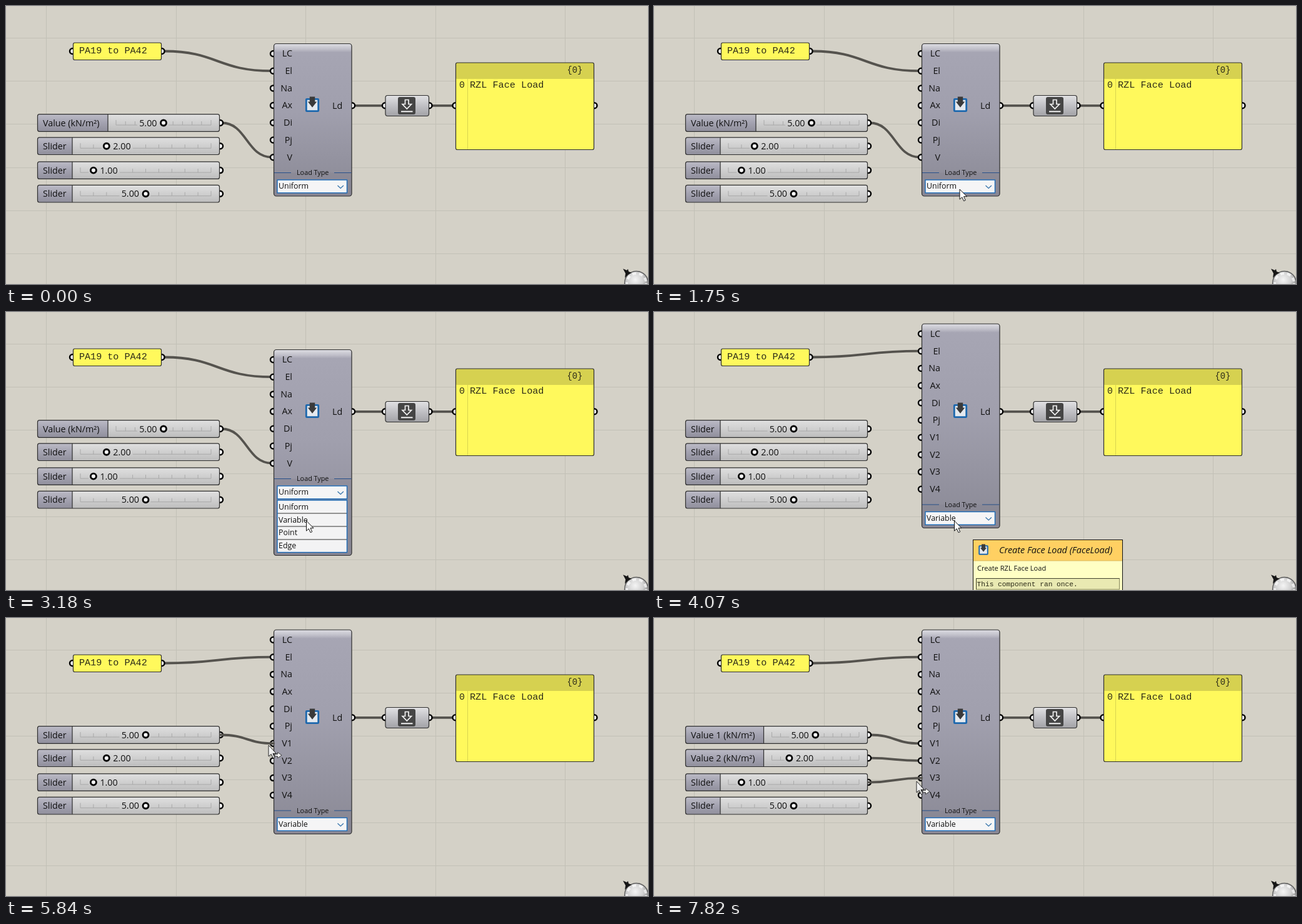
These frames come from a looping animation (1027 px wide and 446 px high, 8 s). An HTML page:

```html
<!DOCTYPE html>
<html lang="en">
<head>
<meta charset="utf-8">
<title>Face load</title>
<style>
html, body { margin: 0; width: 100%; height: 100%; overflow: hidden; background: #d4d1c7; }
svg { display: block; width: 100%; height: 100%; }
text { font-family: "Open Sans", "Noto Sans", sans-serif; font-size: 14.3px; fill: #111; white-space: pre; }
.mono { font-family: "Liberation Mono", monospace; fill: #2c2b18; }
.edge { stroke: #2e2e2e; stroke-width: 1.2; }
.wire { fill: none; stroke: #55534e; stroke-width: 3.8; stroke-linecap: round; }
.grip { fill: #fff; stroke: #000; stroke-width: 2.5; }
</style>
</head>
<body>
<svg viewBox="0 0 1027 446" preserveAspectRatio="none">
  <defs>
    <linearGradient id="body" x2="0" y2="1"><stop stop-color="#a7a6b4"/><stop offset=".45" stop-color="#a09fad"/><stop offset="1" stop-color="#8a8995"/></linearGradient>
    <linearGradient id="gloss" x2="0" y2="1"><stop stop-color="#fff" stop-opacity=".62"/><stop offset=".6" stop-color="#fff" stop-opacity=".3"/><stop offset="1" stop-color="#fff" stop-opacity="0"/></linearGradient>
    <linearGradient id="light" x2="0" y2="1"><stop stop-color="#e0e0e0"/><stop offset=".5" stop-color="#cfcfcf"/><stop offset="1" stop-color="#bdbdbd"/></linearGradient>
    <linearGradient id="tag" x2="0" y2="1"><stop stop-color="#bcbbc6"/><stop offset=".5" stop-color="#a3a2b0"/><stop offset="1" stop-color="#908f9c"/></linearGradient>
    <linearGradient id="node" x2="0" y2="1"><stop stop-color="#e2e2e4"/><stop offset=".5" stop-color="#c0c0c4"/><stop offset="1" stop-color="#a2a2a6"/></linearGradient>
    <linearGradient id="arrow" x2="1" y2="1"><stop stop-color="#fff"/><stop offset="1" stop-color="#d8d8d8"/></linearGradient>
    <radialGradient id="ball" cx=".45" cy=".35"><stop stop-color="#f4f4f4"/><stop offset=".7" stop-color="#cfcfcf"/><stop offset="1" stop-color="#9c9c9c"/></radialGradient>
  </defs>
  <g id="scene"></g>
</svg>
<script>
const LOOP = 8000;
const scene = document.getElementById('scene');
const UNIT = ' (kN/m²)';
const SLIDER_Y = [187.5, 224.7, 263.6, 301.2];
const VALUES = [5, 2, 1, 5];
const PITCH = 27.7;

// Cursor moves: start, end, steps, target x, target y
const MOVES = [
  [100, 860, 8, 345, 201], [980, 980, 1, 344, 191],
  [1310, 1640, 4, 445, 248], [1750, 1750, 1, 489, 294], [1860, 2090, 3, 494, 292],
  [2740, 3180, 5, 480.5, 335],
  [4400, 4940, 6, 343, 218], [5050, 5160, 2, 342, 191],
  [5280, 5840, 6, 420, 204], [5980, 6160, 3, 343, 221],
  [6490, 6710, 3, 431, 227.5], [6820, 7260, 5, 343, 261],
  [7360, 7820, 5, 420, 262]
];
const DRAGS = [[5280, 5980], [6490, 6820], [7360, LOOP]];
const GRIP_CURSOR = [[980, 1310], [4940, 5980], [6160, 6820], [7260, LOOP]];

const within = (t, [a, b]) => t >= a && t < b;
const rect = (x, y, w, h, attrs) => `<rect x="${x}" y="${y}" width="${w}" height="${h}" ${attrs}/>`;
const text = (x, y, s, attrs = '') => `<text x="${x}" y="${y}" ${attrs}>${s}</text>`;
const path = (d, attrs) => `<path d="${d}" ${attrs}/>`;
const grip = (x, y) => `<circle class="grip" cx="${x}" cy="${y}" r="4.5"/>`;
const mono = (x, y, s, size) => text(x, y, s, `class="mono" style="font-size:${size}px"`);
const small = (x, y, s, size) => text(x, y, s, `style="font-size:${size}px"`);

function wire(x1, y1, x2, y2) {
  const m = (x1 + x2) / 2;
  return path(`M${x1} ${y1}C${m} ${y1} ${m} ${y2} ${x2} ${y2}`, 'class="wire"');
}

function grid() {
  let d = '';
  for (let x = 64.5; x < 1027; x += 207.5) d += `M${Math.floor(x) + .5} 0V446`;
  for (let y = 51.5; y < 446; y += 69.2) d += `M0 ${Math.floor(y) + .5}H1027`;
  return path(d, 'stroke="#c2c0b6" fill="none"');
}

function slider(cy, value, name) {
  const split = name === 'Slider' ? 106 : name.startsWith('Value ' + '(') ? 163 : 175.5;
  const start = split + 13, gap = (328 - start) / 10;
  const knob = start + value * gap, left = value >= 5;
  const hideA = knob - (left ? 42 : 8), hideB = knob + (left ? 8 : 42);
  const top = cy - 13.8;
  let ticks = `M${start} ${cy + 3.5}H${Math.max(start, hideA)}M${hideB} ${cy + 3.5}H328`;
  for (let i = 0; i <= 10; i++) {
    const x = start + i * gap;
    if (x < hideA || x > hideB) ticks += `M${x} ${cy + 3.5}v${i % 10 ? -6 : -8}`;
  }
  return grip(342.5, cy) +
    rect(50.5, top, 291, 27.6, 'rx="3" fill="url(#light)"') +
    rect(50.5, top, split - 50.5, 27.6, 'rx="3" fill="url(#tag)"') +
    path(`M${split} ${top}v27.6`, 'class="edge"') +
    rect(50.5, top, 291, 27.6, 'rx="3" fill="none" class="edge"') +
    path(ticks, 'fill="none" stroke="#a9a9a9"') +
    text(59, cy + 5, name) +
    text(left ? knob - 10.5 : knob + 10.5, cy + 5, value.toFixed(2), left ? 'text-anchor="end"' : '') +
    `<circle cx="${knob}" cy="${cy}" r="4.5" fill="#fff" stroke="#000" stroke-width="2.9"/>`;
}

function loadIcon(x, y, k) {
  return `<g transform="translate(${x} ${y}) scale(${k})">` +
    rect(-9.7, -9.7, 19.4, 19.4, 'rx="1" fill="#e4e9ee" stroke="#1c67ad" stroke-width="2.8"') +
    path('M-4.2 -13.5H4.2V-5.5H7.2L0 3.8L-7.2 -5.5H-4.2Z', 'fill="#3a3a3a"') + '</g>';
}

function component(variable, open) {
  const shift = variable ? 41.5 : 0;
  const top = 60.5 - shift, bottom = open ? 390.5 : 305 + shift;
  const names = ['LC', 'El', 'Na', 'Ax', 'Di', 'Pj', ...(variable ? ['V1', 'V2', 'V3', 'V4'] : ['V'])];
  const ys = names.map((_, i) => top + 16 + i * PITCH);
  const h = bottom - top, line = 267.5 + shift;
  let s = ys.map(y => grip(427.5, y)).join('') + grip(553.5, 159.8) +
    rect(428.5, top, 124.5, h, 'rx="4" fill="url(#body)"') +
    rect(429, top, 123.5, 14, 'rx="4" fill="url(#gloss)"') +
    rect(429, line, 123.5, bottom - line, 'rx="3" fill="#858490" opacity=".45"') +
    rect(428.5, top, 124.5, h, 'rx="4" fill="none" class="edge"') +
    names.map((n, i) => text(458, ys[i] + 4.8, n, 'text-anchor="end"')).join('') +
    text(522, 164.5, 'Ld') + loadIcon(490, 159, 1) +
    path(`M429 ${line}H456M525 ${line}H552.5`, 'stroke="#27508a" stroke-width="1.2"') +
    small(465, 271 + shift, 'Load Type', 10.8) +
    rect(434, 279 + shift, 111.5, 20.8, 'fill="#f5f5f6" stroke="#1b6bb8" stroke-width="1.4"') +
    small(436, 293.3 + shift, variable ? 'Variable' : 'Uniform', 12.4) +
    path(`M530.5 ${288 + shift}l4.7 4.4l4.7 -4.4`, 'fill="none" stroke="#2d6ea8" stroke-width="1.2"');
  if (open) {
    s += rect(434, 302, 111.5, 83.6, 'fill="#f3f3f4"') +
      path('M434 323H545.5M434 344H545.5M434 365H545.5', 'stroke="#333" stroke-width="1.1"') +
      rect(434, 302, 111.5, 83.6, 'fill="none" stroke="#1b6bb8" stroke-width="1.4"') +
      ['Uniform', 'Variable', 'Point', 'Edge'].map((n, i) => small(436, 316.8 + i * 20.8, n, 12.4)).join('');
  }
  return s;
}

function panels() {
  return grip(106.5, 72.5) + grip(249, 72.5) +
    rect(107.5, 59, 141, 27.5, 'rx="2.5" fill="#fff95c" class="edge"') +
    mono(117, 75.5, 'PA19 to PA42', 15.1) +
    grip(719, 159.8) + grip(941, 159.8) +
    rect(719.5, 91, 221, 139.5, 'rx="2.5" fill="#fff95c"') +
    rect(719.5, 91, 221, 26, 'rx="2" fill="#d6d150"') +
    path('M738.5 117V230', 'stroke="#d9d44f"') +
    rect(719.5, 91, 221, 139.5, 'rx="2.5" fill="none" class="edge"') +
    mono(897.5, 106.5, '{0}', 13.8) + mono(725, 131, '0', 14.8) +
    mono(742, 131, 'RZL Face Load', 15.2);
}

function previewNode() {
  return grip(606.5, 159.8) + grip(677, 159.8) +
    rect(607, 143.5, 69.5, 33, 'rx="3.5" fill="url(#node)" class="edge"') +
    rect(627, 146, 28, 28, 'rx="3" fill="#454545"') +
    path('M638.5 150.5h5.5v7h4.5l-7.2 7.5l-7.2 -7.5h4.4Z', 'fill="none" stroke="#f2f2f2" stroke-width="1.7"') +
    path('M632 169.3H650.5', 'stroke="#f2f2f2" stroke-width="2"');
}

function compass() {
  return '<circle cx="1008.5" cy="444.5" r="19" fill="url(#ball)" stroke="#5e5e5e" stroke-width="1.3"/>' +
    '<circle cx="1008.5" cy="444.5" r="15.5" fill="none" stroke="#fff" stroke-width="4" stroke-dasharray="6 5" opacity=".7"/>' +
    path('M987 421.5L993 424L995 422L996 426L1001 428L995 431L990 436L991 429Z', 'fill="#161616"');
}

function tooltip(x, y) {
  return `<g transform="translate(${x} ${y})">` +
    rect(.5, .5, 239, 85, 'fill="#ffffc4"') +
    rect(.5, .5, 239, 33.5, 'fill="#ffd062"') +
    path('M0 34H240', 'stroke="#d9b65c"') +
    rect(.5, .5, 239, 85, 'fill="none" stroke="#111"') +
    loadIcon(17, 17, .7) +
    text(42, 21.5, 'Create Face Load (FaceLoad)', 'font-style="italic" style="font-size:14.5px"') +
    small(7, 50, 'Create RZL Face Load', 11.1) +
    rect(5.5, 62.5, 229, 17.5, 'fill="#e9e9b2" stroke="#85855c"') +
    path('M5.5 80V62.5H234.5', 'fill="none" stroke="#3f3f2c"') +
    mono(6.5, 74.5, 'This component ran once.', 11.2) + '</g>';
}

function cursorAt(t) {
  let x = 962, y = 468;
  for (const [a, b, n, tx, ty] of MOVES) {
    if (t < a) break;
    const step = n > 1 ? Math.min(n, 1 + Math.floor((t - a) / (b - a) * (n - 1) + .02)) : 1;
    x += (tx - x) * step / n;
    y += (ty - y) * step / n;
    if (step < n) break;
  }
  return [x, y];
}

function cursor(x, y, gripping) {
  const main = 'M0 0V16.2L3.8 12.7L6.6 18.8L9.2 17.6L6.5 11.7H11.5Z';
  const shape = gripping
    ? path('M1 2V21L6 17L17 20L22 16L12 13Z', 'fill="#000" opacity=".13"') +
      path('M0 0V18L4.2 14.4L7.4 21L10 19.8L7 13.4H12.4Z', 'fill="url(#arrow)" stroke="#222"') +
      path('M10 14.6H14.5V11.5L21 16.2L14.5 20.8V17.8H10Z', 'fill="#f4f4f4" stroke="#333" stroke-width=".9"')
    : path(main, 'fill="#fff" stroke="#111"');
  return `<g transform="translate(${x} ${y})">${shape}</g>`;
}

function frame(t) {
  const variable = t >= 3630, open = t >= 2190 && !variable;
  const [cx, cy] = cursorAt(t);
  const inputY = i => 19 + 16 + (6 + i) * PITCH;
  const linked = DRAGS.map(d => t >= d[1]);

  let s = grid() + wire(252, 72.5, 425, variable ? 62.7 : 104.2) +
    wire(557, 159.8, 604, 159.8) + wire(680, 159.8, 716, 159.8);
  if (!variable) s += wire(345, 187.5, 425, 242.5);
  linked.forEach((on, i) => { if (on) s += wire(345, SLIDER_Y[i], 425, inputY(i)); });

  s += panels() + previewNode() + component(variable, open);
  SLIDER_Y.forEach((y, i) => {
    const name = !variable && i === 0 ? 'Value' + UNIT : linked[i] ? `Value ${i + 1}` + UNIT : 'Slider';
    s += slider(y, VALUES[i], name);
  });
  s += compass();

  DRAGS.forEach((d, i) => {
    if (!within(t, d)) return;
    const snap = cx > 408;
    s += wire(343, SLIDER_Y[i], snap ? 428 : cx, snap ? inputY(i) : cy);
  });
  if (within(t, [2520, 2740])) s += tooltip(524, 322);
  if (within(t, [4070, 4400])) s += tooltip(510, 365);
  if (t >= 100) s += cursor(cx, cy, GRIP_CURSOR.some(g => within(t, g)));
  return s;
}

let last = '';
function tick(now) {
  const s = frame(now % LOOP);
  if (s !== last) scene.innerHTML = last = s;
  requestAnimationFrame(tick);
}
tick(0);
</script>
</body>
</html>
```
